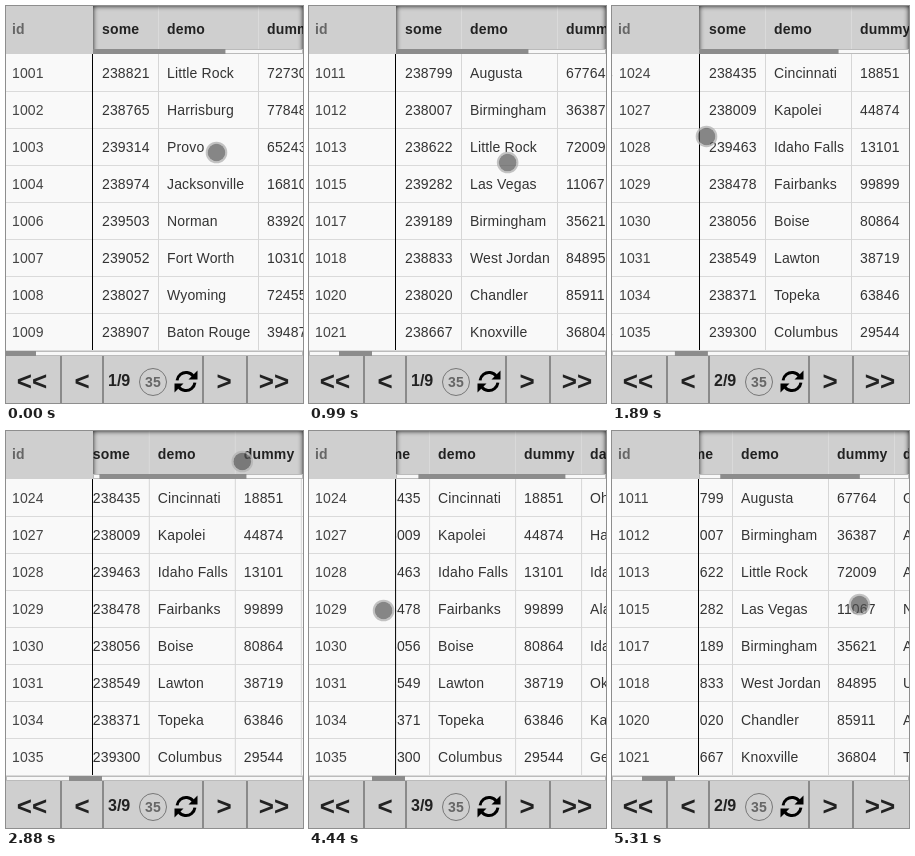
Recreate the animation shown at these times as an HTML page with a canvas. Size 297 by 397 pixels, loop 5.34 s.

```html
<!DOCTYPE html>
<html lang="en">
<head>
<meta charset="utf-8">
<title>Swipeable data table</title>
<style>
html, body { margin: 0; width: 100%; height: 100%; overflow: hidden; background: #f9f9f9; }
canvas { display: block; width: 100vw; height: 100vh; }
</style>
</head>
<body>
<canvas id="stage"></canvas>
<script>
const W = 297, H = 397, LOOP = 5340, HEAD = 48, ROW = 37, FIX = 87;
const FONT = '"Liberation Sans", Arial, sans-serif';
const canvas = document.getElementById('stage');
const ctx = canvas.getContext('2d');
const dpr = window.devicePixelRatio || 1;
canvas.width = W * dpr;
canvas.height = H * dpr;

const headers = ['some', 'demo', 'dummy', 'data'];
const page = (cols, text) => ({ cols, rows: text.split(';').map(r => r.split(',')) });
const pages = [
  page([66, 100, 66, 101],
    '1001,238821,Little Rock,72730,Arkansas;1002,238765,Harrisburg,77848,Pennsylvania;' +
    '1003,239314,Provo,65243,Utah;1004,238974,Jacksonville,16810,Florida;' +
    '1006,239503,Norman,83920,Oklahoma;1007,239052,Fort Worth,10310,Texas;' +
    '1008,238027,Wyoming,72455,Michigan;1009,238907,Baton Rouge,39487,Louisiana'),
  page([66, 96, 66, 88],
    '1011,238799,Augusta,67764,Georgia;1012,238007,Birmingham,36387,Alabama;' +
    '1013,238622,Little Rock,72009,Arkansas;1015,239282,Las Vegas,11067,Nevada;' +
    '1017,239189,Birmingham,35621,Alabama;1018,238833,West Jordan,84895,Utah;' +
    '1020,238020,Chandler,85911,Arizona;1021,238667,Knoxville,36804,Tennessee'),
  page([66, 86, 66, 82],
    '1024,238435,Cincinnati,18851,Ohio;1027,238009,Kapolei,44874,Hawaii;' +
    '1028,239463,Idaho Falls,13101,Idaho;1029,238478,Fairbanks,99899,Alaska;' +
    '1030,238056,Boise,80864,Idaho;1031,238549,Lawton,38719,Oklahoma;' +
    '1034,238371,Topeka,63846,Kansas;1035,239300,Columbus,29544,Georgia')
];

// time, x, y of the pointer
const pointer = [
  [0, 210, 146], [120, 206, 145], [540, 88, 138], [620, 78, 137], [990, 198, 156],
  [1080, 206, 157], [1200, 204, 156], [1600, 102, 134], [1890, 94, 130], [2160, 199, 51],
  [2640, 247, 31], [2820, 247, 31], [2880, 236, 30], [3180, 168, 28], [3330, 168, 28],
  [3510, 214, 28], [3570, 216, 28], [3720, 216, 28], [4230, 66, 178], [4440, 74, 179],
  [4660, 190, 178], [5310, 247, 173], [5340, 247, 173]
];
// time, horizontal scroll of the columns
const colScroll = [[0, 0], [2820, 0], [2880, 9], [3180, 82], [3330, 82], [3510, 37], [3570, 32], [5340, 32]];
const swipes = [
  { start: 90, release: 620, end: 1020, from: 0, to: 1 },
  { start: 1200, release: 1650, end: 2050, from: 1, to: 2 },
  { start: 4440, release: 4660, end: 5060, from: 2, to: 1 }
];

// smooth monotone interpolation through key points
function track(keys, t, c) {
  let i = 0;
  while (i < keys.length - 2 && t >= keys[i + 1][0]) i++;
  const slope = k => k < 0 || k > keys.length - 2 ? 0
    : (keys[k + 1][c] - keys[k][c]) / (keys[k + 1][0] - keys[k][0]);
  const tangent = k => {
    const a = slope(k - 1), b = slope(k);
    return a * b > 0 ? 2 * a * b / (a + b) : 0;
  };
  const a = keys[i], b = keys[i + 1], d = b[0] - a[0], u = (t - a[0]) / d;
  const v = u * u * (3 - 2 * u);
  return a[c] + (b[c] - a[c]) * v +
    d * (u * (1 - u) * (1 - u) * tangent(i) - u * u * (1 - u) * tangent(i + 1));
}

function stateAt(t) {
  const s = { pos: 0, head: 0, label: 0, scroll: track(colScroll, t, 1) };
  for (const w of swipes) {
    if (t < w.start) break;
    const x = k => track(pointer, k, 1);
    const dragged = k => w.from * W - (x(k) - x(w.start));
    if (t < w.release) { s.pos = dragged(t); continue; }
    const goal = w.to * W, u = Math.min(1, (t - w.release) / (w.end - w.release));
    s.pos = goal + (dragged(w.release) - goal) * Math.pow(1 - u, 5.7);
    s.head = w.to;
    if (u === 1) s.label = w.to;
  }
  return s;
}

function rect(x, y, w, h, color) {
  ctx.fillStyle = color;
  ctx.fillRect(x, y, w, h);
}

function text(str, x, y, size, color, bold, align) {
  ctx.font = (bold ? 'bold ' : '') + size + 'px ' + FONT;
  ctx.letterSpacing = size === 14 ? '0.15px' : '0px';
  ctx.textAlign = align || 'left';
  ctx.fillStyle = color;
  ctx.fillText(str, x, y);
}

function clipped(x, y, w, h, draw) {
  ctx.save();
  ctx.beginPath();
  ctx.rect(x, y, w, h);
  ctx.clip();
  draw();
  ctx.restore();
}

// soft shadow falling inward from the edges of a box
function innerShadow(x, y, w, h) {
  ctx.save();
  ctx.shadowColor = 'rgba(0,0,0,0.9)';
  ctx.shadowBlur = 5 * dpr;
  ctx.lineWidth = 8;
  ctx.strokeStyle = '#000';
  ctx.strokeRect(x - 4, y - 4, w + 8, h + 8);
  ctx.restore();
}

function scrollbar(x, y, w, thumbX, thumbW) {
  rect(x, y, w, 5, '#bbb');
  rect(x + 1, y + 1, w - 2, 3, '#f8f8f8');
  rect(thumbX, y, thumbW, 5, '#8c8c8c');
}

function drawPage(p, x0, scroll) {
  rect(x0, HEAD, W, ROW * 8, '#f9f9f9');
  p.rows.forEach((r, i) => {
    const top = HEAD + i * ROW;
    rect(x0, top + ROW, W, 1, '#dadada');
    text(r[0], x0 + 6, top + 24, 14, '#444');
  });
  clipped(x0 + FIX, HEAD, W - FIX, ROW * 8, () => {
    let x = x0 + FIX - scroll;
    p.cols.forEach((w, c) => {
      p.rows.forEach((r, i) => text(r[c + 1], x + (c ? 8 : 9), HEAD + i * ROW + 24, 14, '#333'));
      x += w;
      rect(x - 1, HEAD, 1, ROW * 8, '#d6d6d6');
    });
  });
  rect(x0 + FIX - 1, HEAD, 1, ROW * 8, '#000');
}

function drawHeader(s) {
  rect(0, 0, W, HEAD, '#cfcfcf');
  text('id', 6, 28, 14, '#666', true);
  const nudge = Math.max(-1, Math.min(1, s.head * W - s.pos));
  const view = W - FIX, total = pages[s.label].cols.reduce((a, b) => a + b);
  clipped(FIX, 0, view, HEAD, () => {
    let x = FIX - s.scroll + nudge;
    pages[s.head].cols.forEach((w, c) => {
      text(headers[c], x + (c ? 8 : 9), 28, 14, '#222', true);
      x += w;
      rect(x - 1, 0, 1, 43, '#dadada');
    });
    innerShadow(FIX, 0, view, HEAD + 8);
    scrollbar(FIX, 43, view, FIX + s.scroll * view / total, view * view / total);
  });
}

function refreshHalf() {
  ctx.beginPath();
  ctx.arc(0, 0, 9, Math.PI * 1.04, Math.PI * 1.8);
  ctx.stroke();
  ctx.beginPath();
  ctx.moveTo(11.5, -11);
  ctx.lineTo(11.5, -2);
  ctx.lineTo(2.5, -2);
  ctx.fill();
}

function drawFooter(s) {
  scrollbar(0, 345, W, s.pos / 9 - 3, 33);
  rect(0, 350, W, H - 350, '#cfcfcf');
  for (const x of [54, 96, 196, 240]) rect(x, 350, 2, H - 350, '#8a8a8a');
  [['<<', 26], ['<', 76], ['>', 218], ['>>', 268]].forEach(b => text(b[0], b[1], 384, 26, '#222', true, 'center'));
  text(s.label + 1 + '/9', 102, 380, 16, '#222', true);
  ctx.strokeStyle = '#777';
  ctx.lineWidth = 1;
  ctx.beginPath();
  ctx.arc(147, 376, 13.5, 0, 7);
  ctx.stroke();
  text('35', 147, 381, 14, '#666', true, 'center');
  ctx.save();
  ctx.translate(180, 375.5);
  ctx.strokeStyle = ctx.fillStyle = '#000';
  ctx.lineWidth = 3;
  refreshHalf();
  ctx.rotate(Math.PI);
  refreshHalf();
  ctx.restore();
}

function drawPointer(x, y) {
  ctx.beginPath();
  ctx.arc(x, y, 9, 0, 7);
  ctx.fillStyle = 'rgba(80,80,80,0.68)';
  ctx.fill();
  ctx.beginPath();
  ctx.arc(x, y, 9.8, 0, 7);
  ctx.strokeStyle = 'rgba(180,180,180,0.8)';
  ctx.lineWidth = 2;
  ctx.stroke();
}

function render(t) {
  const s = stateAt(t);
  ctx.setTransform(dpr, 0, 0, dpr, 0, 0);
  rect(0, 0, W, H, '#f9f9f9');
  pages.forEach((p, i) => {
    const x = i * W - s.pos;
    if (Math.abs(x) < W) drawPage(p, x, s.scroll);
  });
  drawHeader(s);
  drawFooter(s);
  drawPointer(track(pointer, t, 1) + 0.5, track(pointer, t, 2) + 0.5);
}

const begin = performance.now();
function tick() {
  render((performance.now() - begin) % LOOP);
  requestAnimationFrame(tick);
}
tick();
</script>
</body>
</html>
```
